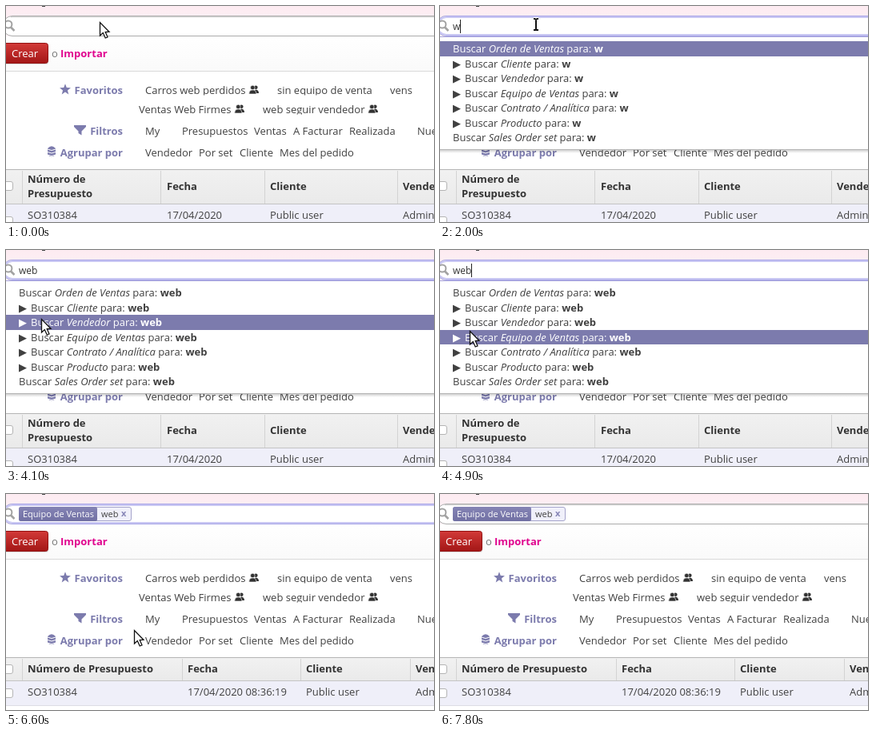
Recreate the animation shown at these times as an HTML page. Size 535 by 270 pixels, loop 7900 ms.

```html
<!DOCTYPE html>
<html lang="es">
<head>
<meta charset="utf-8">
<style>
  html, body { margin: 0; height: 100%; overflow: hidden; background: #fff; }
  svg { display: block; width: 535px; height: 270px; }
  text { font: 13px "Open Sans", "Noto Sans", sans-serif; fill: #404040; }
  .b { font-weight: 700; }
  .i { font-style: italic; }
  .head { font-weight: 700; fill: #333; }
  .label { font-weight: 700; fill: #7c7bad; text-anchor: end; }
  .icon { fill: #7c7bad; }
  .input { font-size: 12px; fill: #333; }
  .facet { font-size: 11px; }
  .mark { font-family: "DejaVu Sans", sans-serif; }
  .on text, .on tspan { fill: #fff; }
  .box { fill: #fff; stroke: #b4b4b4; }
</style>
</head>
<body>
<svg id="stage" viewBox="0 0 535 270"></svg>
<script>
const LOOP = 7900;
const stage = document.getElementById('stage');

const text = (x, y, str, cls = '') => `<text x="${x}" y="${y}" class="${cls}">${str}</text>`;
const rect = (x, y, w, h, fill, extra = '') =>
  `<rect x="${x}" y="${y}" width="${w}" height="${h}" fill="${fill}" ${extra}/>`;
const line = (x, y, w, h, fill) => rect(x, y, w, h, fill);
const gradient = (id, from, to) =>
  `<linearGradient id="${id}" x2="0" y2="1"><stop stop-color="${from}"/><stop offset="1" stop-color="${to}"/></linearGradient>`;
const group = (id, body, attrs = '') => `<g id="${id}" ${attrs}>${body}</g>`;
const checkbox = y => `<rect class="box" x="-4.5" y="${y + .5}" width="13" height="11" rx="2.5"/>`;
const people = (x, y) => `<g transform="translate(${x} ${y})" fill="#333">
  <circle cx="8.3" cy="2.8" r="2.3"/><path d="M6 10V7L8.3 5.5Q12 6 12 10Z"/>
  <g stroke="#fff" stroke-width=".6"><circle cx="4.3" cy="3" r="2.8"/>
  <path d="M-.3 11Q-.3 6.5 3 6H5.6Q9 6.5 9 11Z"/></g></g>`;

const defs = `<defs>
  ${gradient('top', '#fdebf1', '#fdf5f8')}${gradient('bar', '#ffffff', '#fafafa')}
  ${gradient('red', '#d23a38', '#a31616')}${gradient('grey', '#f1f1f1', '#eaeaea')}
  ${gradient('violet', '#8584b5', '#7170a3')}${gradient('shade', '#00000038', '#00000000')}
  <clipPath id="rows"><path d="M160 95H535V111.5H160ZM160 119H535V135.5H160Z"/></clipPath></defs>`;

const searchBox = stroke =>
  `<rect x="-4.5" y="12.5" width="560" height="25" rx="12.5" fill="#fff" stroke="${stroke}"/>`;

const header = rect(0, 0, 535, 39, 'url(#top)') + line(45, 0, 4, 1, '#444') +
  rect(0, 38, 535, 43, 'url(#bar)') + line(0, 81, 535, 1, '#d9d9d9') +
  searchBox('#ababab') + line(6, 13, 529, 2, 'url(#shade)') +
  group('focus', searchBox('#a7a4e6') +
    '<rect x="-3" y="14" width="560" height="22" rx="11" fill="none" stroke="#c9c7f3" stroke-width="2"/>') +
  '<g fill="none" stroke="#a3a3a3" stroke-width="2"><circle cx="2.8" cy="23" r="4.6"/><path d="M6 26.5L10.5 31" stroke-width="2.6"/></g>' +
  rect(-5, 47, 58, 26, '#0002', 'rx="3"') +
  rect(-5.5, 46.5, 58, 25, 'url(#red)', 'rx="3" stroke="#931313"') +
  text(7, 64, 'Crear').replace('<text', '<text style="fill:#fff"') +
  text(57, 64, 'o').replace('<text', '<text style="fill:#777"') +
  text(68, 64, 'Importar', 'b').replace('<text', '<text style="fill:#e0058f"');

const star = Array.from({ length: 10 }, (_, k) => {
  const r = k % 2 ? 3.1 : 7.3, a = k * Math.PI / 5;
  return `${74 + r * Math.sin(a)},${104.5 - r * Math.cos(a)}`;
}).join(' ');

const favourites = [[174, 110, 'Carros web perdidos'], [339, 110, 'sin equipo de venta'], [480, 110, 'vens'],
  [166, 134, 'Ventas Web Firmes'], [321, 134, 'web seguir vendedor']];
const filters = [[174, 161, 'My'], [220, 161, 'Presupuestos'], [310, 161, 'Ventas'], [359, 161, 'A Facturar'],
  [429, 161, 'Realizada'], [514, 161, 'Nuevo'], [174, 188, 'Vendedor'], [241, 188, 'Por set'],
  [292, 188, 'Cliente'], [342, 188, 'Mes del pedido']];
const texts = list => list.map(a => text(...a)).join('');

const drawer = `<polygon class="icon" points="${star}"/>
  <path class="icon" d="M85 149H100V151L94.5 156.5V161.5L90.5 159V156.5L85 151Z"/>
  <path class="icon" d="M52 178V186Q57 190.5 62 186V178Q57 172.5 52 178Z"/>
  <path d="M52 179Q57 182 62 179M52 182.5Q57 185.5 62 182.5M52 186Q57 189 62 186" fill="none" stroke="#fff"/>` +
  text(146, 110, 'Favoritos', 'label') + text(146, 161, 'Filtros', 'label') + text(146, 188, 'Agrupar por', 'label') +
  `<g clip-path="url(#rows)">${texts(favourites)}</g>` + texts(filters) +
  people(304, 99) + people(286, 123) + people(453, 123);

const columns = (xs, y) => ['Fecha', 'Cliente', 'Vendedor'].map((s, k) => text(xs[k], y, s, 'head')).join('');
const dividers = (xs, h) => xs.map(x => line(x, 206, 1, h, '#d3d3d3')).join('');
const tableHead = h => rect(0, 205, 535, h, 'url(#grey)') + line(0, 204, 535, 1, '#b5b5b5');
const record = (xs, y, date) =>
  ['SO310384', date, 'Public user', 'Administrator'].map((s, k) => text(xs[k], y, s)).join('');

const tables =
  group('allOrders', tableHead(42) + line(0, 247, 535, 1, '#c4c4c4') + rect(0, 248, 535, 22, '#efeff9') +
    dividers([20, 193, 323, 489], 41) + checkbox(219) + checkbox(263) +
    text(27, 221, 'Número de', 'head') + text(27, 239, 'Presupuesto', 'head') +
    columns([201, 330, 496], 230) + record([27, 201, 330, 496], 266, '17/04/2020')) +
  group('emptyList', tableHead(37) + checkbox(213) +
    text(27, 223, 'Número de Presupuesto', 'head') + columns([298, 393, 500], 223)) +
  group('found', tableHead(28) + line(0, 233, 535, 1, '#c4c4c4') + rect(0, 234, 535, 30, '#efeff9') +
    line(0, 264, 535, 1, '#dcdce4') + dividers([20, 220, 368, 505], 27) + checkbox(213) + checkbox(243) +
    text(27, 223, 'Número de Presupuesto', 'head') + columns([227, 375, 512], 223) +
    record([27, 227, 375, 512], 252, '17/04/2020 08:36:19'));

const facet = group('facet',
  rect(16.5, 16.5, 140, 17, '#f0f0fa', 'rx="2.5" stroke="#a5a4cb"') +
  rect(16, 16, 98, 18, 'url(#violet)', 'rx="2.5"') +
  text(21, 29, 'Equipo de Ventas', 'facet').replace('<text', '<text style="fill:#fff"') +
  text(119, 29, 'web', 'facet') +
  text(144, 28, 'x', 'facet b').replace('<text', '<text style="fill:#8786b7"'));

const rowTop = k => Math.round(44 + 18.5 * k);
const choices = ['Orden de Ventas', 'Cliente', 'Vendedor', 'Equipo de Ventas', 'Contrato / Analítica', 'Producto', 'Sales Order set'];
const menu = group('menu',
  rect(0, 179, 535, 5, 'url(#shade)') + rect(0, 39, 535, 140, '#fff') +
  line(0, 38, 535, 1, '#a9a6dd') + line(0, 179, 535, 1, '#b3b3b3') +
  rect(0, 44, 535, 19, '#7c7bad', 'id="highlight"') +
  choices.map((name, k) => {
    const nested = k > 0 && k < 6, y = rowTop(k) + 14;
    return `<g class="row">${nested ? text(16, y, '▶', 'mark') : ''}${text(nested ? 31 : 16, y,
      `Buscar <tspan class="i">${name}</tspan> para: <tspan class="b query"></tspan>`)}</g>`;
  }).join(''));

const pointers =
  `<path id="arrow" d="M.5 .5V17L4.3 13.5L7.2 20L10 18.8L7.2 12.5L12 12.2Z" fill="#fff" stroke="#111" stroke-width="1.3"/>` +
  group('beam', ['#fff" stroke-width="4', '#111" stroke-width="2'].map(s =>
    `<path d="M-3-7H-1.5L0-6L1.5-7H3M0-6V6M-3 7H-1.5L0 6L1.5 7H3" fill="none" stroke="${s}"/>`).join(''));

stage.innerHTML = defs + rect(0, 0, 535, 270, '#fff') + header + drawer + tables + facet +
  text(16, 30, '', 'input').replace('<text', '<text id="typed"') + menu +
  rect(0, 17, 1, 17, '#222', 'id="caret"') + pointers;

const el = id => document.getElementById(id);
const show = (id, visible) => { el(id).style.display = visible ? '' : 'none'; };
const rows = [...document.querySelectorAll('.row')];
const queries = [...document.querySelectorAll('.query')];

// time, x, y of the mouse
const path = [[0, 117, 20], [200, 117, 20], [300, 120, 23], [2800, 120, 23], [3000, 103, 28], [3300, 63, 55],
  [3400, 63, 55], [3600, 57, 62], [4200, 41, 91], [4900, 37, 101], [5500, 37, 101], [5600, 37, 102],
  [5900, 37, 102], [6100, 62, 88], [6200, 97, 88], [6300, 97, 88], [6600, 160, 170], [6800, 215, 201],
  [6900, 258, 199], [7100, 307, 130], [7300, 88, 5], [LOOP, 88, 5]];

function mouseAt(t) {
  const k = path.findIndex(p => p[0] > t);
  const [t0, x0, y0] = path[k - 1], [t1, x1, y1] = path[k];
  const f = (t - t0) / (t1 - t0);
  return [Math.round(x0 + (x1 - x0) * f), Math.round(y0 + (y1 - y0) * f)];
}

function draw(now) {
  const t = Math.floor(now % LOOP / 100) * 100;
  const within = (a, b) => t >= a && t < b;
  const [x, y] = mouseAt(t);

  show('allOrders', t < 5600);
  show('emptyList', within(5600, 6000));
  show('found', t >= 6000);
  show('facet', t >= 5300);
  show('menu', within(2000, 5200));
  el('focus').style.opacity = within(500, 7800) ? Math.min(1, (t - 400) / 300) : 0;

  const query = within(2000, 5300) ? 'web'.slice(0, t < 2200 ? 1 : t < 2400 ? 2 : 3) : '';
  el('typed').textContent = query;
  queries.forEach(q => { q.textContent = query; });

  const active = Math.max(0, Math.floor((y - 44) / 18.5));
  rows.forEach((row, k) => row.classList.toggle('on', k === active));
  el('highlight').setAttribute('y', rowTop(active));
  el('highlight').setAttribute('height', rowTop(active + 1) - rowTop(active));

  show('caret', within(500, 3000) || within(4400, 6400) || within(7600, 7800));
  el('caret').setAttribute('x', t >= 5300 ? 163 : [16, 25, 32, 39][query.length]);

  const beam = within(300, 3100);
  show('beam', beam);
  show('arrow', !beam && t < 7400);
  el(beam ? 'beam' : 'arrow').setAttribute('transform', `translate(${x} ${y})`);
}

const start = performance.now();
(function tick() {
  draw(performance.now() - start);
  requestAnimationFrame(tick);
})();
</script>
</body>
</html>
```
